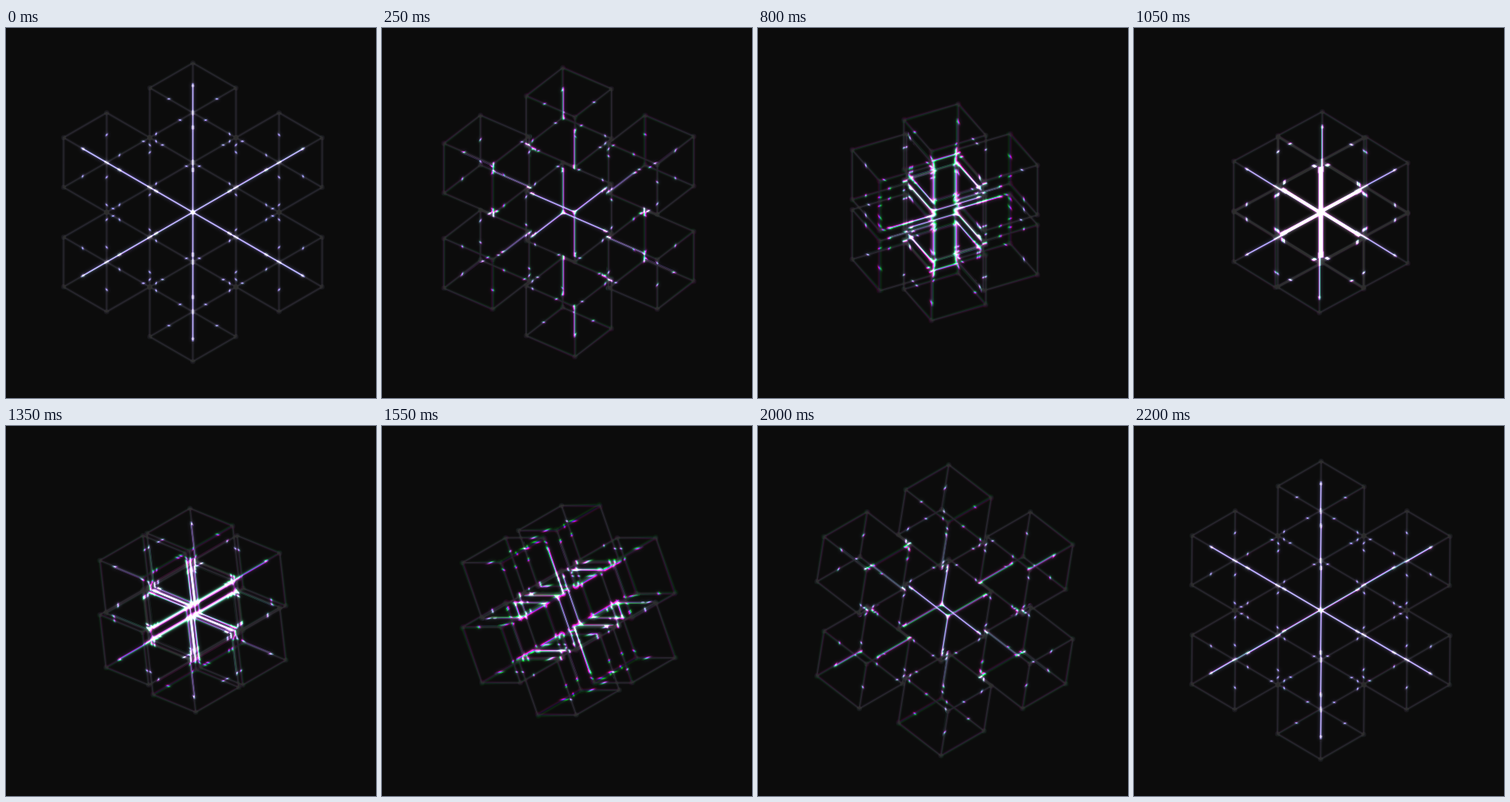
These frames come from a looping animation (498 by 498 pixels, 2250 ms). An HTML page with a canvas:

```html
<!DOCTYPE html>
<html lang="en">
<head>
<meta charset="utf-8">
<title>Seven turning cubes</title>
<style>
  html, body { margin: 0; width: 100%; height: 100%; overflow: hidden; background: #0c0c0c; }
  canvas { display: block; width: 498px; height: 498px; }
</style>
</head>
<body>
<canvas id="stage" width="498" height="498"></canvas>
<script>
const SIZE = 498, CX = 251.5, CY = 248;
// The second turn cuts in just before the first has settled.
const LOOP = 2250, TURN_TIME = 1170, SECOND_START = 1100, SWITCH = 1125;
const SPOKE = 67;                  // projected edge length in the isometric view
const HALF_WIDTH = 58;             // half diagonal of a cube face
const ECHO_SCALE = 0.852;
// Each colour channel samples a slightly different moment.
const CHANNELS = [
  { color: 'rgb(202,0,0)', lag: -9 },
  { color: 'rgb(0,192,0)', lag: 9 },
  { color: 'rgb(0,0,250)', lag: -4 }
];

function makeLayer() {
  const canvas = document.createElement('canvas');
  canvas.width = canvas.height = SIZE;
  return canvas.getContext('2d');
}

const screen = document.getElementById('stage').getContext('2d');
const wire = makeLayer();
const echo = makeLayer();
const glow = makeLayer();

const easeInOut = u => u < 0.5 ? 2 * u * u : 1 - 2 * (1 - u) ** 2;

function poseAt(time) {
  const t = ((time % LOOP) + LOOP) % LOOP;
  const first = t < SWITCH;
  const p = easeInOut((first ? t : t - SECOND_START) / TURN_TIME);
  return {
    turn: p * Math.PI / 2,
    tilt: first ? 0 : Math.PI * 2 / 3,
    spread: SPOKE * (first ? 2 - p : 1 + p)
  };
}

// Corners 0-3 form the top face, 4-7 the bottom face.
function cubeCorners({ turn, tilt }) {
  const c = Math.cos(tilt), s = Math.sin(tilt);
  return Array.from({ length: 8 }, (_, i) => {
    const a = turn + (i % 4) * Math.PI / 2;
    const x = -HALF_WIDTH * Math.sin(a);
    const y = SPOKE / 2 * ((i < 4 ? -1 : 1) - Math.cos(a));
    return [x * c + y * s, y * c - x * s];
  });
}

function cubeCenters(spread) {
  const centers = [[0, 0]];
  for (let i = 0; i < 6; i++) {
    const a = i * Math.PI / 3;
    centers.push([spread * Math.sin(a), -spread * Math.cos(a)]);
  }
  return centers;
}

function cubePaths(corners, [cx, cy]) {
  const edges = new Path2D(), nodes = new Path2D();
  const link = (i, j) => {
    edges.moveTo(cx + corners[i][0], cy + corners[i][1]);
    edges.lineTo(cx + corners[j][0], cy + corners[j][1]);
  };
  for (let i = 0; i < 4; i++) {
    link(i, (i + 1) % 4);
    link(i + 4, (i + 1) % 4 + 4);
    link(i, i + 4);
  }
  for (const [x, y] of corners) {
    nodes.moveTo(cx + x + 3.5, cy + y);
    nodes.arc(cx + x, cy + y, 3.5, 0, Math.PI * 2);
  }
  return { edges, nodes };
}

function clear(ctx, color) {
  ctx.globalCompositeOperation = 'source-over';
  ctx.globalAlpha = 1;
  ctx.fillStyle = color;
  ctx.fillRect(0, 0, SIZE, SIZE);
}

function strokeEdges(ctx, path, width, alpha) {
  ctx.lineWidth = width;
  ctx.globalAlpha = alpha;
  ctx.stroke(path);
}

function drawWire(ctx, time, scale) {
  clear(ctx, '#000');
  ctx.save();
  ctx.translate(CX, CY);
  ctx.scale(scale, scale);
  ctx.globalCompositeOperation = 'lighter';
  ctx.lineCap = 'round';
  for (const { color, lag } of CHANNELS) {
    const pose = poseAt(time + lag);
    const corners = cubeCorners(pose);
    ctx.strokeStyle = ctx.fillStyle = color;
    for (const center of cubeCenters(pose.spread)) {
      const { edges, nodes } = cubePaths(corners, center);
      strokeEdges(ctx, edges, 5, 0.22);
      strokeEdges(ctx, edges, 2.1, 0.72);
      ctx.globalAlpha = 0.4;
      ctx.fill(nodes);
    }
  }
  ctx.restore();
}

// Light appears only where the wire meets its smaller echo.
function drawGlow() {
  clear(glow, '#000');
  glow.drawImage(wire.canvas, 0, 0);
  glow.globalCompositeOperation = 'multiply';
  glow.drawImage(echo.canvas, 0, 0);
}

function addLight(layer, alpha, blur) {
  screen.globalAlpha = alpha;
  screen.filter = `blur(${blur}px)`;
  screen.drawImage(layer.canvas, 0, 0);
  screen.filter = 'none';
}

function render(time) {
  drawWire(wire, time, 1);
  drawWire(echo, time, ECHO_SCALE);
  drawGlow();
  clear(screen, '#0c0c0c');
  screen.globalCompositeOperation = 'lighter';
  addLight(wire, 0.13, 0.4);
  addLight(glow, 1, 0.6);
  addLight(glow, 0.5, 2.5);
}

let start;
function tick(now) {
  start ??= now;
  render(now - start);
  requestAnimationFrame(tick);
}
render(0);
requestAnimationFrame(tick);
</script>
</body>
</html>
```
